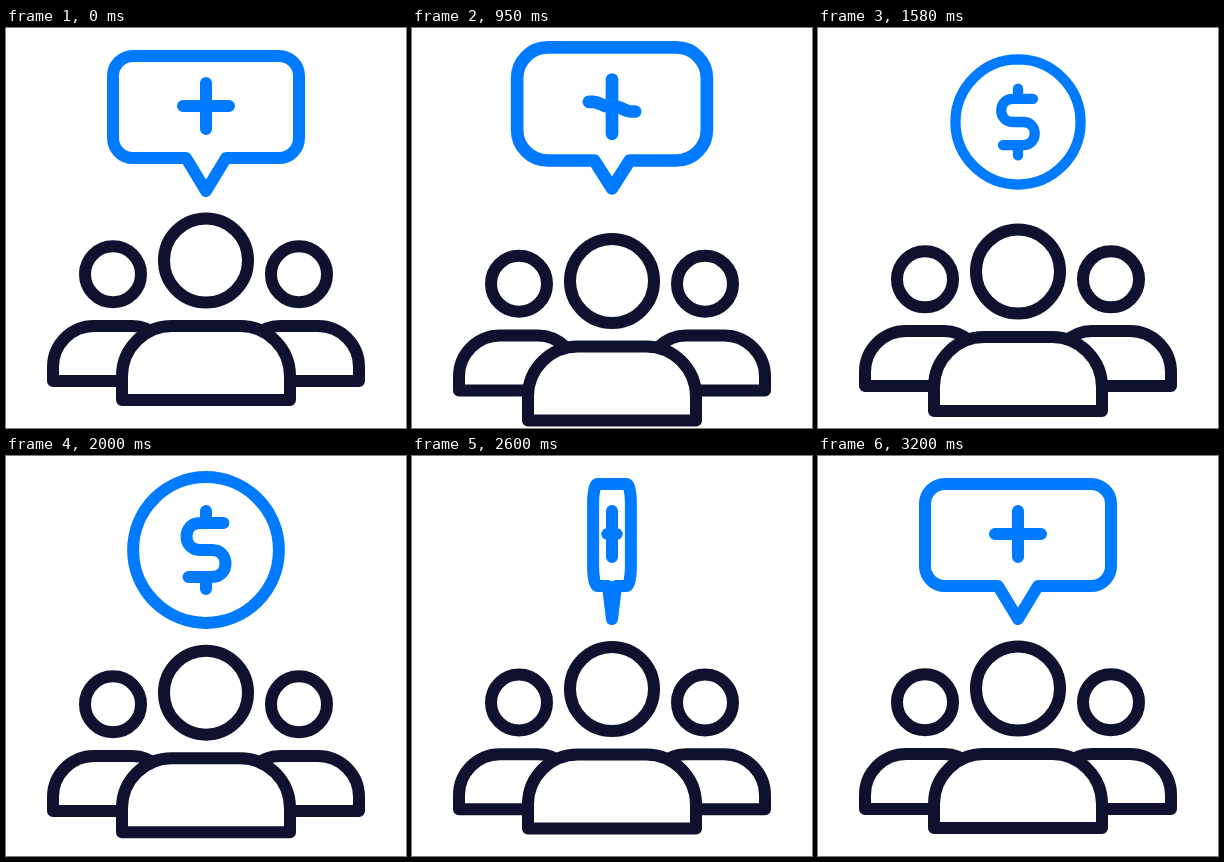
Write an HTML page that moves like this. It is 400 px wide and 400 px high and loops after 3.23 s.

```html
<!DOCTYPE html>
<html lang="en">
<head>
<meta charset="utf-8">
<title>Group health funding</title>
<style>
html, body { margin: 0; width: 100%; height: 100%; overflow: hidden; background: #fff; }
svg { display: block; width: 100vw; height: 100vh; }
path, circle { stroke-width: 12; stroke-linecap: round; stroke-linejoin: round; fill: #fff; }
#people { stroke: #10112f; }
#icon { stroke: #007bff; }
#icon path { fill: none; }
</style>
</head>
<body>
<svg viewBox="0 0 400 400">
  <g id="people">
    <g id="sides">
      <g id="side">
        <circle cx="107" cy="246.3" r="28"/>
        <path d="M122 353H47V339A41 41 0 0 1 88 298H126Q141 298 153 309"/>
      </g>
      <use href="#side" transform="matrix(-1 0 0 1 400 0)"/>
    </g>
    <g id="leader">
      <circle cx="200" cy="232.5" r="42"/>
      <path d="M116 372V348A50 50 0 0 1 166 298H234A50 50 0 0 1 284 348V372Z"/>
    </g>
  </g>
  <g id="icon">
    <path id="outline"/>
    <path id="mark"/>
  </g>
</svg>
<script>
const LOOP = 3230, HOLD = 230, STEP = 30, SWAP = 2557;

const $ = id => document.getElementById(id);
const lerp = (a, b, p) => a + (b - a) * p;
const span = (t, a, b) => Math.min(1, Math.max(0, (t - a) / (b - a)));
const quarter = x => Math.sin(Math.PI / 2 * x);
const inOut = x => x < 0.5 ? 4 * x ** 3 : 1 - (2 - 2 * x) ** 3 / 2;
const bell = (t, mid, width) => Math.exp(-(((t - mid) / width) ** 2));

// upper half of the dollar's S; the lower half is the same, turned around (200, 94)
const half = [[217.5, 67], [194, 67], [176, 67], [176, 94], [194, 94]];
const S = [...half, ...half.map(([x, y]) => [400 - x, 188 - y]).reverse()];

// the group sinks quickly and rises slowly
const bobAt = t => 20.6 * (t < 880 ? quarter(span(t, HOLD, 880)) : bell(t, 880, 884));

// both icons dip and recover; the coin shrinks a little before it turns
const scaleAt = t => 1 - 0.125 * bell(t, 475, 130) + 0.075 * bell(t, 840, 220)
  - 0.143 * bell(t, 1580, 160) - 0.035 * bell(t, 2450, 250);

const tiltAt = t => -Math.PI / 9 * Math.sin(Math.PI * span(t, HOLD, 720));

function outline(p, s, k) {
  const y0 = lerp(165, 94, p);
  const X = x => (200 + x * s * k).toFixed(2);
  const Y = y => (y0 + (y - y0) * s).toFixed(2);
  const hw = lerp(93, 73, p), top = lerp(28, 21, p), bot = lerp(130, 167, p ** 1.3);
  const r = Math.min(lerp(20, 73, p), hw, (bot - top) / 2);
  const tipW = Math.min(20 * (1 - p), hw - r), tip = Math.max(bot, 163 - 18 * p);
  const arc = (x, y) => `A${r * s * k} ${r * s} 0 0 1 ${X(x)} ${Y(y)}`;
  return `M${X(r - hw)} ${Y(top)}H${X(hw - r)}${arc(hw, top + r)}V${Y(bot - r)}${arc(hw - r, bot)}`
    + `H${X(tipW)}L${X(0)} ${Y(tip)}L${X(-tipW)} ${Y(bot)}H${X(r - hw)}`
    + `${arc(-hw, bot - r)}V${Y(top + r)}${arc(r - hw, top)}Z`;
}

function mark(p, s, k, tilt) {
  const y0 = lerp(165, 94, p ** 0.2), cos = Math.cos(tilt), sin = Math.sin(tilt);
  const pt = (x, y) => {
    const dx = x - 200, dy = y - 78;
    const px = dx * cos - dy * sin, py = 78 + dx * sin + dy * cos;
    return `${(200 + px * s * k).toFixed(2)} ${(y0 + (py - y0) * s).toFixed(2)} `;
  };
  const q = S.map(([x, y], i) => pt(lerp(177 + 46 * i / 9, x, p * p), lerp(78, y, p)));
  const bar = (from, to) => `M${pt(200, from)}L${pt(200, to)}`;
  return `M${q[0]}L${q[1]}C${q[2]}${q[3]}${q[4]}L${q[5]}C${q[6]}${q[7]}${q[8]}L${q[9]}`
    + bar(55, lerp(78, 67, p)) + bar(lerp(101, 133, p), lerp(78, 121, p));
}

function draw(t) {
  const bob = bobAt(t);
  $('leader').setAttribute('transform', `translate(0 ${bob})`);
  $('sides').setAttribute('transform', `translate(0 ${bob * 0.46})`);

  // p: bubble to coin, k: width while turning
  const back = t >= SWAP;
  const p = back ? 0 : inOut(span(t, 790, 1250));
  const s = back ? 1 : scaleAt(t);
  const k = back ? quarter(span(t, SWAP, 2887)) : quarter(1 - span(t, 2330, SWAP));
  $('outline').setAttribute('d', outline(p, s, k));
  $('mark').setAttribute('d', mark(p, s, k, tiltAt(t)));
  for (const id of ['outline', 'mark']) $(id).style.strokeWidth = 12 * s;
}

const start = performance.now();
function tick() {
  const t = (performance.now() - start) % LOOP;
  draw(t < HOLD ? 0 : HOLD + STEP * Math.floor((t - HOLD) / STEP));
  requestAnimationFrame(tick);
}
tick();
</script>
</body>
</html>
```
